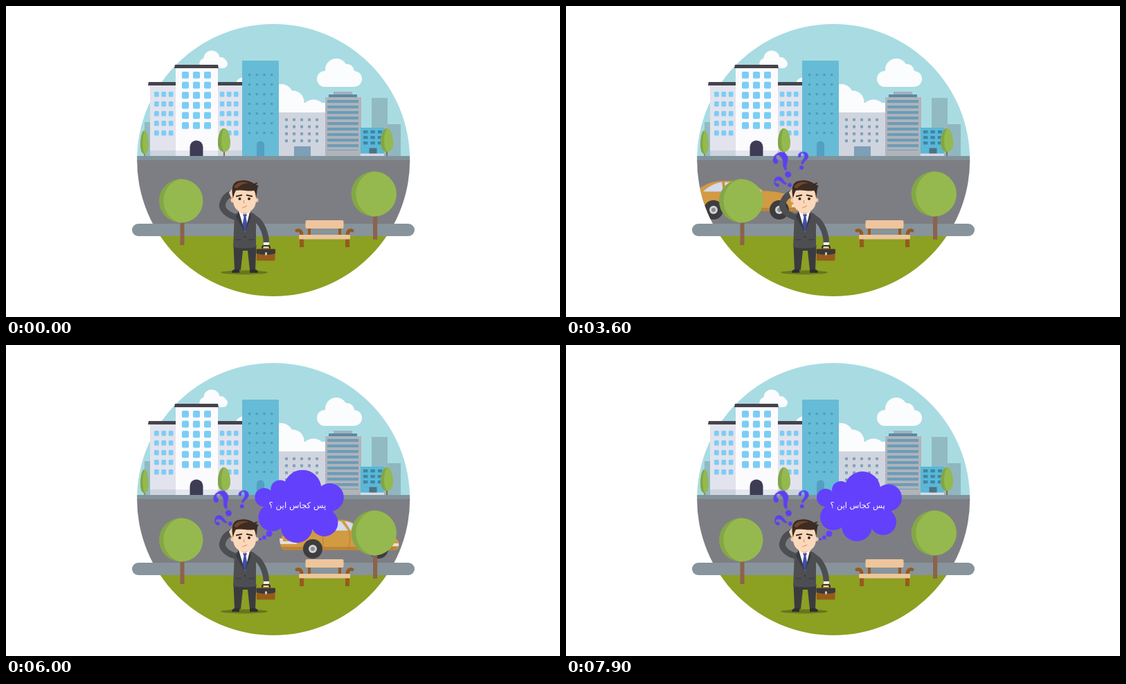
Write an HTML page without scripts that moves like this. It is 800 px wide and 450 px high and loops after 8 s.

```html
<!DOCTYPE html>
<html lang="en">
<head>
<meta charset="utf-8">
<title>Waiting in the park</title>
<style>
html, body { margin: 0; width: 100%; height: 100%; overflow: hidden; background: #fff; }
svg { display: block; width: 800px; height: 450px; }
.car { animation: drive 8s linear infinite; }
.sway { animation: sway 8s ease-in-out infinite; }
.q1 { animation: q1 8s ease-out infinite; }
.q2 { animation: q2 8s ease-out infinite; }
.q3 { animation: q3 8s ease-out infinite; }
.d1 { animation: d1 8s ease-out infinite; }
.d2 { animation: d2 8s ease-out infinite; }
.d3 { animation: d3 8s ease-out infinite; }
.cloud { animation: cloud 8s ease-out infinite; }
.say { font: 11.3px "DejaVu Sans", "Noto Serif", serif; fill: #fff; text-anchor: middle; direction: rtl; }
@keyframes drive {
  from { transform: translate(-132px, 295px); }
  to { transform: translate(634.4px, 295px); }
}
@keyframes sway {
  0%, 45% { transform: none; }
  58.7% { transform: translate(-2px, .5px); }
  68.7%, 100% { transform: translate(.7px, -.5px); }
}
@keyframes q1 {
  0%, 9% { transform: translate(18px, 8px) scale(0); }
  15% { transform: scale(1.08); }
  17.5%, 100% { transform: none; }
}
@keyframes q2 {
  0%, 12% { transform: translate(16px, 26px) scale(0); }
  17.5% { transform: translate(6px, 11px) scale(.95); }
  24% { transform: translate(-1px, -2px) scale(1.05); }
  28%, 100% { transform: none; }
}
@keyframes q3 {
  0%, 28% { transform: translate(0, 34px) scale(0); }
  37% { transform: translate(0, -6px) scale(1.1); }
  42%, 100% { transform: none; }
}
@keyframes d1 { 0%, 53% { transform: scale(0); } 58%, 100% { transform: none; } }
@keyframes d2 { 0%, 56% { transform: scale(0); } 62%, 100% { transform: none; } }
@keyframes d3 { 0%, 62% { transform: scale(0); } 68%, 100% { transform: none; } }
@keyframes cloud {
  0%, 69% { transform: scale(0); }
  76% { transform: scale(1.08); }
  79% { transform: scale(.98); }
  81.25% { transform: translate(0, 1.2px); }
  90%, 100% { transform: none; }
}
</style>
</head>
<body>
<svg viewBox="0 0 800 450">
<defs>
  <clipPath id="disc"><circle cx="386.2" cy="223" r="197"/></clipPath>
  <pattern id="winMain" x="254" y="95" width="16" height="14.6" patternUnits="userSpaceOnUse">
    <rect width="10" height="10" rx="2" fill="#7bcdf6"/>
  </pattern>
  <pattern id="winL" x="214" y="124" width="10.4" height="14" patternUnits="userSpaceOnUse">
    <rect width="6.8" height="7.5" rx="1.5" fill="#7bcdf6"/>
  </pattern>
  <pattern id="winR" x="308.5" y="124" width="10.2" height="14" patternUnits="userSpaceOnUse">
    <rect width="6.8" height="7.5" rx="1.5" fill="#7bcdf6"/>
  </pattern>
  <pattern id="winTower" x="350" y="98" width="10.7" height="14" patternUnits="userSpaceOnUse">
    <rect width="3.2" height="3.2" fill="#4b9dc1"/>
  </pattern>
  <pattern id="winGrey" x="403" y="162.5" width="11" height="10.2" patternUnits="userSpaceOnUse">
    <rect width="4" height="4" fill="#7aa2bb"/>
  </pattern>
  <pattern id="bars" x="464" y="136" width="46" height="8" patternUnits="userSpaceOnUse">
    <rect width="46" height="4.2" fill="#6c9cb8"/>
  </pattern>
  <pattern id="winShop" x="516" y="180" width="10.4" height="8" patternUnits="userSpaceOnUse">
    <rect width="6.4" height="4.4" fill="#3f84a4"/>
  </pattern>
  <g id="sapling">
    <path d="M-1 8h2v16h-2z" fill="#916644"/>
    <path d="M0-17C6-17 9-5 9 4S5 17 0 17S-9 13-9 4S-6-17 0-17" fill="#94b94e"/>
    <path d="M0-17C-6-17-9-5-9 4S-5 17 0 17C-3 12-4 8-4 2S-3-12 0-17" fill="#80a648"/>
  </g>
  <g id="tree">
    <path d="M-1 20h6v44h-6z" fill="#8c624b"/>
    <circle r="31.5" fill="#83a747"/>
    <path d="M-2-31.4A31.5 31.5 0 1 1-2 31.4C-14 28-25 16-25 0S-14-28-2-31.4" fill="#95b94e"/>
  </g>
  <g id="mark" fill="#5d3ff0">
    <path d="M-7-6C-7.500-11-3-13 1-13C6-13 8-9 7-5C6-1 2 0 1 5H-.5C-2 0 2-2 2-6C2-9 1-11-1-11.500C-3-11.500-4-10-3-8C-2-5-6-3-7-6Z" stroke="#5d3ff0" stroke-width=".6"/>
    <circle cy="10" r="3"/>
  </g>
  <g id="wheel">
    <circle r="14" fill="#3d3d40"/>
    <circle r="6" fill="#d2d2d5"/>
    <circle r="3" fill="#8b8b8f"/>
  </g>
</defs>

<!-- ground and sky -->
<g clip-path="url(#disc)">
  <path d="M180 20h420v200H180z" fill="#a8dce2"/>
  <path d="M180 217h420v7H180z" fill="#82929a"/>
  <path d="M180 223h420v95H180z" fill="#7d7e83"/>
  <path d="M180 330h420v100H180z" fill="#8ca022"/>
  <g fill="#91bac2">
    <path d="M528 133h23v84h-23zM200 168h10v49h-10z"/>
    <path d="M551 171h19v46h-19z" fill="#90b6bf"/>
  </g>
</g>
<g fill="#fbfcfe">
  <circle cx="297" cy="76" r="11.500"/><circle cx="287" cy="83" r="7.500"/><circle cx="310" cy="82" r="8"/>
  <rect x="279.500" y="77" width="40.500" height="13" rx="6.500"/>
  <circle cx="477" cy="92" r="16"/><circle cx="492" cy="95" r="11"/>
  <rect x="449" y="94" width="65" height="23" rx="11.500"/>
  <circle cx="344" cy="116" r="13"/><circle cx="397" cy="131" r="18"/>
  <circle cx="414" cy="139" r="16.500"/><circle cx="444" cy="153" r="17.500"/>
  <path d="M394 140h67v16h-67z"/>
</g>

<!-- buildings -->
<path d="M208 113h133v104H208z" fill="#e2e3ec"/>
<path d="M208 209h133v8H208z" fill="#cbd3de"/>
<path d="M206 110h135v5H205z" fill="#44434e"/>
<path d="M214 124h28v64h-28z" fill="url(#winL)"/>
<path d="M308.500 124h28v64h-28z" fill="url(#winR)"/>
<path d="M245 88h61v129h-61z" fill="#fbfbfe"/>
<path d="M245 209h61v8h-61z" fill="#e5e8ef"/>
<path d="M244 85h62l1 5h-64z" fill="#44434e"/>
<path d="M254 95h42v84h-42z" fill="url(#winMain)"/>
<path d="M265.500 217v-13a9.500 9.500 0 0 1 19 0v13z" fill="#3e3c55"/>

<rect x="341" y="79" width="53" height="139" rx="1.500" fill="#66bbd6"/>
<path d="M350 98h36v89h-36z" fill="url(#winTower)"/>
<path d="M362 217v-16a5.500 5.500 0 0 1 11 0v16z" fill="#539fc1"/>

<path d="M394 154h67v63h-67z" fill="#d0d4de"/>
<path d="M403 162.500h49v36h-49z" fill="url(#winGrey)"/>
<path d="M416 203h24v14h-24z" fill="#7d9fb7"/>

<path d="M473 124h27v5h-27z" fill="#9fb0ba"/>
<path d="M466 128h41v5h-41z" fill="#5e88a5"/>
<path d="M461 132h52v85h-52z" fill="#b0b4ba"/>
<path d="M464 136h45v73h-45z" fill="url(#bars)"/>

<path d="M512 176h34v38h-34z" fill="#59b8d8"/>
<path d="M516 180h28v21h-28z" fill="url(#winShop)"/>
<path d="M524.500 205.500h11v9h-11z" fill="#4f7184"/>
<path d="M512 213.500h34v3.500h-34z" fill="#d5dde5"/>

<use href="#sapling" transform="translate(200 197) scale(.65 1)"/>
<use href="#sapling" transform="translate(315 194)"/>
<use href="#sapling" transform="translate(550 194)"/>
<path d="M190 217h393v6H190z" fill="#82929a"/>

<!-- traffic -->
<g clip-path="url(#disc)"><g class="car">
  <path d="M-46-13C-46-18-42-22-36-24L-22-30C-12-37-2-42 14-42H40C56-42 63-34 72-27.500C90-27 115-23 123-12C127-5 123 1 118 2H-40C-46 0-48-6-46-13Z" fill="#d29a43"/>
  <path d="M-46-3H123L118 2H-40Z" fill="#bb8438"/>
  <path d="M-15-26.500C-7-34 2-39 12-40L14-26.500ZM17-26.500L16-40H41L51-26.500ZM55-26.500L46-40C57-39 64-33 70-26.500Z" fill="#d3dbee"/>
  <path d="M15-41V-2M52-26C55-16 54-8 51-2M20-21h6" fill="none" stroke="#b67d31"/>
  <path d="M-48-15h5v4h20v4h-24zM113-8h11v4h-11z" fill="#e4dfda"/>
  <path d="M113-18l7 5-6 1z" fill="#f0dfbd"/>
  <use href="#wheel"/><use href="#wheel" x="95"/>
</g></g>

<!-- park -->
<rect x="182" y="315" width="408" height="18" rx="9" fill="#87949b"/>
<use href="#tree" transform="translate(252.500 282)"/>
<use href="#tree" transform="translate(531 272) scale(1.030)"/>
<g fill="#965a1c">
  <path d="M436 320h4v12h-4zM480 320h4v12h-4zM424 336h6v13h-6zM490 336h6v13h-6z"/>
  <path d="M420 325q6-2 7 6M500 325q-6-2-7 6" fill="none" stroke="#965a1c" stroke-width="5" stroke-linecap="round"/>
</g>
<rect x="432.500" y="310" width="55" height="12" rx="2" fill="#eec59c"/>
<rect x="423" y="331" width="74" height="6.500" rx="1.500" fill="#eec59c"/>

<!-- question marks -->
<g class="sway">
  <g transform="translate(313.400 256.200)"><g class="q1"><use href="#mark" transform="rotate(-74)"/></g></g>
  <g transform="translate(314 230.500)"><g class="q2"><use href="#mark" transform="rotate(-27) scale(1.480)"/></g></g>
  <g transform="translate(341.400 224)"><g class="q3"><use href="#mark" transform="rotate(8)"/></g></g>
</g>

<!-- man -->
<ellipse cx="344" cy="385.500" rx="34" ry="3" fill="#65771f"/>
<path d="M333 306C318 302 310 293 313 285C315 278 319 274 326 271" fill="none" stroke="#4d4e52" stroke-width="9"/>
<path d="M322 270l5-6 4 2v12l-6-1z" fill="#f9d3b5"/>
<path d="M328.500 346h33l-1.500 36h-8l-3-28h-7l-3 28h-9z" fill="#3b3b3f"/>
<path d="M326 386q0-5 6-5h5v5zM364 386q0-5-6-5h-6v5z" fill="#2f2f32"/>
<path d="M357 306C367 310 375 325 376 342" fill="none" stroke="#4d4e52" stroke-width="8.500"/>
<path d="M372 342h8v3h-8z" fill="#fff"/>
<path d="M372 345h7v5h-7z" fill="#f9d3b5"/>
<path d="M330 302q4-3 8-4h14q7 2 9 6v45q-16 3-33 0z" fill="#4d4e52"/>
<path d="M336 297h17l-8 31z" fill="#fff"/>
<path d="M342 302l3-3 3 3-1.500 3 2.500 15-4 6-4-6 2.500-15z" fill="#3d4fae"/>
<path d="M336 297l-4 8 13 23 9-23-2-7-7 29z" fill="#3a3b40"/>
<path d="M331 338h8M350 338h9" stroke="#38393d"/>
<circle cx="345" cy="334" r="1" fill="#2b2b2e"/>
<path d="M338 291h13v7l-6.500 4-6.500-4z" fill="#efbd98"/>
<circle cx="328" cy="281" r="3.500" fill="#f5c8a6"/><circle cx="361.500" cy="281" r="3" fill="#f5c8a6"/>
<path d="M328 266h33v15C361 293 353 299 344.500 299S328 293 328 281Z" fill="#fcd8bb"/>
<path d="M328 278C325 266 326 254 337 253C346 251 354 254 358 257L364 255 361 259 365 260C362 262 363 270 361 277C360 272 360 269 358 267C349 269 341 265 332 267C330 270 329 274 328 278Z" fill="#3b2c24"/>
<path d="M329 262C333 255 341 253 351 256C344 256 337 260 333 264Z" fill="#74452a"/>
<path d="M332 275.500l9-2M347 273.500l9 2" stroke="#3b2c24" stroke-width="2"/>
<circle cx="337.500" cy="279" r="2" fill="#2d2826"/><circle cx="351" cy="279" r="2" fill="#2d2826"/>
<path d="M344 281q-2 4 1 4M341 292q4-1 7-3" fill="none" stroke="#d9976f" stroke-width="1.200"/>
<path d="M370 352v-3q0-2 2-2h7q2 0 2 2v3" fill="none" stroke="#333336" stroke-width="2"/>
<rect x="362" y="351" width="26.500" height="17.500" rx="1.500" fill="#965a1c"/>
<path d="M361.500 352h27.500v6q-7 2-13.500 2t-14-2z" fill="#39393c"/>
<path d="M374 356.500h3v4h-3z" fill="#d5c6a5"/>

<!-- thought -->
<g fill="#6340fc">
  <g transform="translate(367.500 281)"><circle class="d1" r="2"/></g>
  <g transform="translate(373 278.500)"><circle class="d2" r="3"/></g>
  <g transform="translate(380 273)"><circle class="d3" r="4.500"/></g>
  <g transform="translate(423 233)"><g class="cloud">
    <ellipse cy="2" rx="48" ry="32"/>
    <circle cx="-48" cy="-12" r="13"/><circle cx="-26" cy="-23" r="13"/>
    <circle cx="5" cy="-24" r="26"/><circle cx="42.500" cy="-12" r="19.500"/>
    <circle cx="35" cy="23" r="19"/><circle cx="-3" cy="29" r="22"/>
    <circle cx="-37" cy="16" r="19"/>
    <text class="say" x="-2" y="3">پس کجاس این ؟</text>
  </g></g>
</g>
</svg>
</body>
</html>
```
